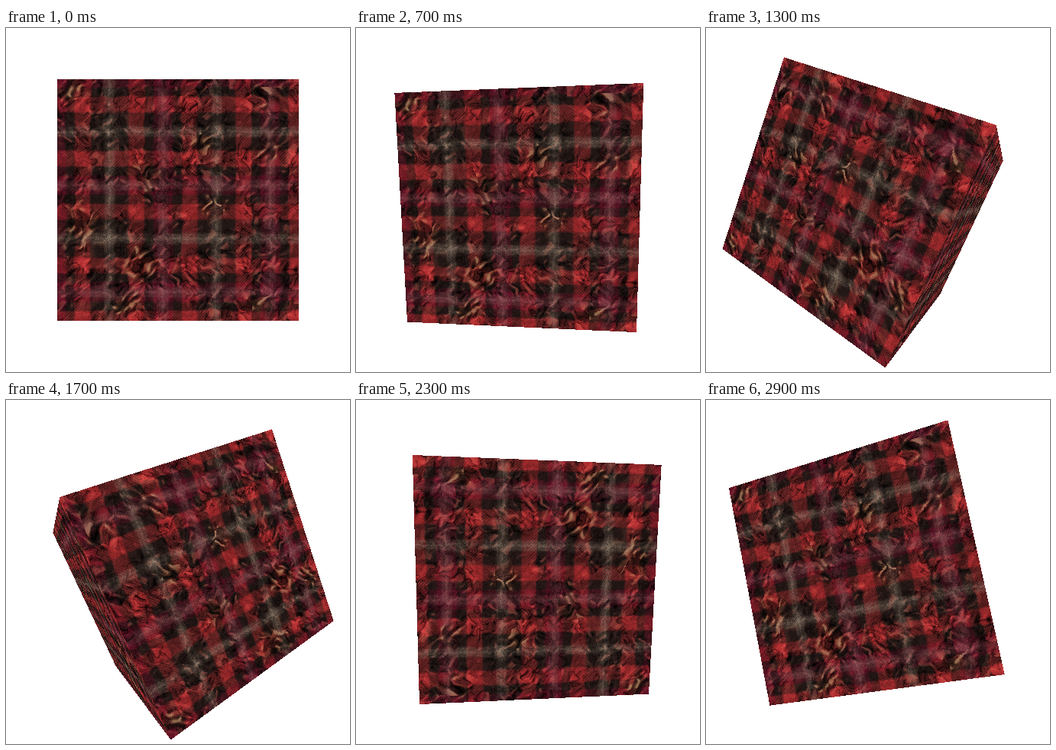
An HTML page with a canvas for the animation above (3 s loop, 450 by 450 pixels).

```html
<!DOCTYPE html>
<html lang="en">
<head>
<meta charset="utf-8">
<title>Tartan cube</title>
<style>
html, body { margin: 0; width: 100%; height: 100%; overflow: hidden; background: #fff; }
canvas { display: block; width: 450px; height: 450px; }
</style>
</head>
<body>
<canvas id="stage" width="450" height="450"></canvas>
<script>
const SIZE = 450, TEX = 316, STEPS = 30, STEP_MS = 100;
const FOCAL = 225 * Math.sqrt(3), CAMERA = 2 * Math.sqrt(3);

const ctx = document.getElementById('stage').getContext('2d');
const image = ctx.createImageData(SIZE, SIZE);
const pixels = new Uint32Array(image.data.buffer);

const clamp = (v, lo = 0, hi = 1) => Math.min(hi, Math.max(lo, v));
const smooth = (a, b, v) => { const t = clamp((v - a) / (b - a)); return t * t * (3 - 2 * t); };
const mix = (a, b, t) => a.map((v, i) => v + (b[i] - v) * t);
const pack = c => (255 << 24 | clamp(c[2], 0, 255) << 16 | clamp(c[1], 0, 255) << 8 | clamp(c[0], 0, 255)) >>> 0;

function hash(i, j, seed) {
  let h = Math.imul(i, 374761393) ^ Math.imul(j, 668265263) ^ Math.imul(seed, 1274126177);
  h = Math.imul(h ^ h >>> 13, 1274126177);
  h = Math.imul(h ^ h >>> 15, 2246822519);
  return ((h ^ h >>> 16) >>> 0) / 4294967296;
}

function noise(x, y, seed) {
  const i = Math.floor(x), j = Math.floor(y);
  const a = smooth(0, 1, x - i), b = smooth(0, 1, y - j);
  const top = hash(i, j, seed) * (1 - a) + hash(i + 1, j, seed) * a;
  const low = hash(i, j + 1, seed) * (1 - a) + hash(i + 1, j + 1, seed) * a;
  return top * (1 - b) + low * b;
}

// Tartan: bands repeat every 140, pale threads every 70
const CHARCOAL = [36, 24, 22], RED = [150, 40, 42], CRIMSON = [88, 17, 34];
const CREAM = [158, 142, 122], PINK = [152, 104, 102], BROWN = [104, 58, 38], BLACK = [22, 14, 11];

function band(p) {
  const q = (p - 68 + 280) % 140, d = Math.min(q, 140 - q);
  const inner = mix(CHARCOAL, RED, smooth(23, 27, d));
  return mix(mix(inner, CHARCOAL, smooth(44, 47, d)), CRIMSON, smooth(56, 59, d));
}

function thread(p) {
  const k = Math.round((p - 68) / 70), d = Math.abs(p - 68 - 70 * k);
  const power = 0.5 * Math.exp(-d * d / 9) + 0.26 * Math.exp(-((d - 5) ** 2) / 5);
  return { power: k < 0 || k > 3 ? 0 : power, color: k % 2 ? PINK : CREAM };
}

// Dark, brownish crumpled spots: x, y, radius
const SPOTS = [[30, 192, 36], [118, 128, 30], [205, 166, 30], [190, 84, 18], [276, 22, 22],
  [112, 240, 28], [90, 292, 24], [276, 88, 22], [14, 15, 18], [262, 290, 20]];

function cloth(u, v) {
  const n1 = noise(u / 10, v / 10, 1) - 0.5, n2 = noise(u / 10, v / 10, 2) - 0.5;
  let spot = 0;
  for (const [x, y, r] of SPOTS) spot = Math.max(spot, 1 - Math.hypot(u - x + 20 * n1, v - y + 20 * n2) / r);
  spot = smooth(0, 0.6, spot);
  const crumple = Math.max(spot, 0.3 + 0.7 * smooth(0.25, 0.6, noise(u / 26, v / 26, 3)));

  const x = u + n1 * 5 * crumple, y = v + n2 * 5 * crumple;
  const twill = (Math.floor(u) + Math.floor(v)) % 4 < 2 ? 0.4 : 0.6;
  let c = mix(band(x), band(y), twill);

  // Folds are long in one diagonal or the other
  const lean = noise(u / 30, v / 30, 7) < 0.65 ? 1 : -1;
  const along = (u - lean * v) / 13 + n1 * 1.2, across = (u + lean * v) / 6 + n2 * 1.6;
  const fold = noise(along, across, 4);
  const crease = 1 - Math.abs(2 * noise(along * 1.2, across * 1.1, 5) - 1);
  const shade = 1 + crumple * ((fold - 0.5) * 0.9 - 0.5 * smooth(0.75, 0.98, crease));
  c = mix(c, mix(BLACK, BROWN, smooth(0.25, 0.75, fold)), spot * 0.5).map(k => k * shade);
  c = mix(c, [184, 84, 70], crumple * (1 - spot * 0.5) * 0.4 * smooth(0.7, 0.9, fold));
  c = mix(c, [176, 148, 108], spot * 0.6 * smooth(0.72, 0.88, fold));

  const grain = 0.55 + 0.8 * hash(Math.floor(u), Math.floor(v), 6);
  for (const p of [x, y]) {
    const t = thread(p);
    c = mix(c, t.color, clamp(t.power * grain * (1 - crumple * 0.75 * (1 - fold))));
  }
  const speck = (hash(Math.floor(u), Math.floor(v), 8) - 0.5) * 20;
  return c.map(k => k + speck * (0.5 + k / 200));
}

const texture = new Uint32Array(TEX * TEX);
for (let v = 0; v < TEX; v++)
  for (let u = 0; u < TEX; u++) texture[v * TEX + u] = pack(cloth(u, v));

function texel(u, v) {
  const i = clamp((u + 1) / 2 * TEX, 0, TEX - 1) | 0;
  const j = clamp((v + 1) / 2 * TEX, 0, TEX - 1) | 0;
  return texture[j * TEX + i];
}

function render(step) {
  const angle = -2 * Math.PI * step / STEPS, c = Math.cos(angle), s = Math.sin(angle);
  // Camera in cube space
  const ox = CAMERA * s * c, oy = -CAMERA * s * s, oz = CAMERA * c;
  for (let py = 0; py < SIZE; py++) {
    const y = (SIZE / 2 - py - 0.5) / FOCAL;
    for (let px = 0; px < SIZE; px++) {
      const x = (px + 0.5 - SIZE / 2) / FOCAL;
      const turned = x * c - s;
      const dx = turned * c + y * s || 1e-9;
      const dy = y * c - turned * s || 1e-9;
      const dz = -c - x * s || 1e-9;
      const sx = Math.sign(dx), sy = Math.sign(dy), sz = Math.sign(dz);
      const tx = (-sx - ox) / dx, ty = (-sy - oy) / dy, tz = (-sz - oz) / dz;
      const near = Math.max(tx, ty, tz);
      const far = Math.min((sx - ox) / dx, (sy - oy) / dy, (sz - oz) / dz);
      let color = 0xffffffff;
      if (near < far) {
        const hx = ox + dx * near, hy = oy + dy * near, hz = oz + dz * near;
        if (near === tx) color = sx < 0 ? texel(-hz, -hy) : texel(-hy, -hz);
        else if (near === ty) color = sy < 0 ? texel(hx, hz) : texel(hz, hx);
        else color = sz < 0 ? texel(hx, -hy) : texel(-hy, hx);
      }
      pixels[py * SIZE + px] = color;
    }
  }
  ctx.putImageData(image, 0, 0);
}

let shown = -1;
const start = performance.now();
function tick() {
  const step = Math.floor((performance.now() - start) / STEP_MS) % STEPS;
  if (step !== shown) render(shown = step);
  requestAnimationFrame(tick);
}
tick();
</script>
</body>
</html>
```
